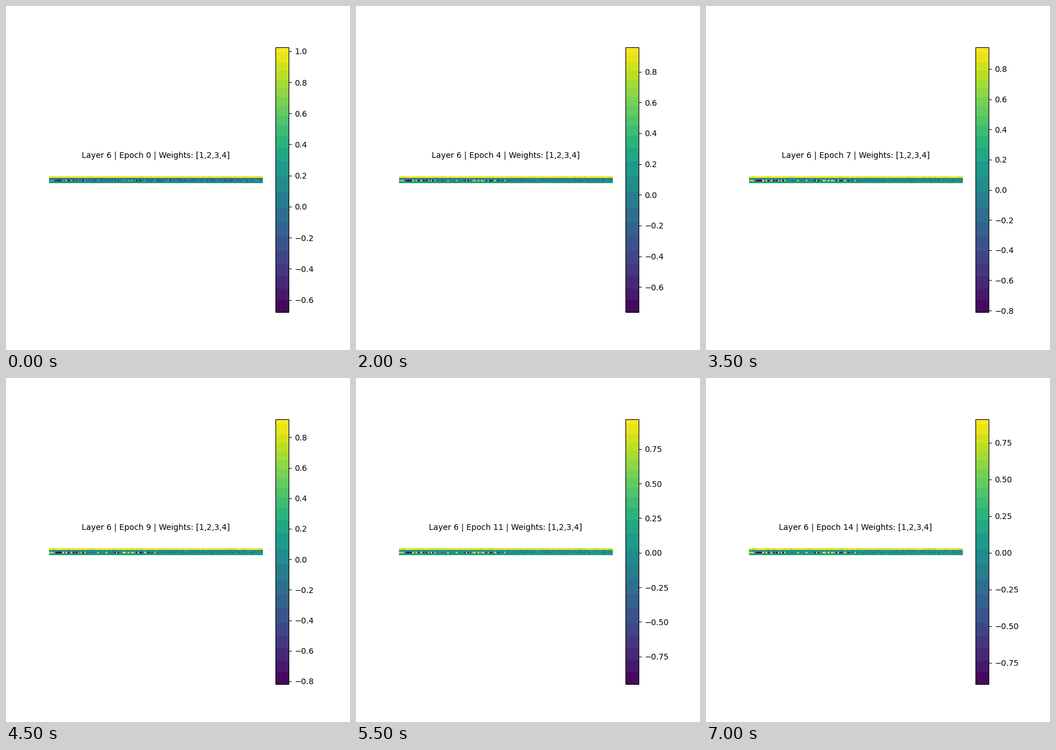
Recreate the animation shown at these times as a matplotlib script. Size 600 by 600 pixels, loop 7500 ms.

```python
import numpy as np
import matplotlib.pyplot as plt
from matplotlib.animation import FuncAnimation
from matplotlib.colors import ListedColormap

EPOCHS = 15
UNITS = 128
BANDS = 22.5

# Key points of the value range: epoch, lowest, highest
RANGE = np.array([
    (0, -.679, 1.025), (1, -.749, 1.001), (2, -.768, .981),
    (4, -.763, .959), (6, -.807, .957), (10, -.823, .905),
    (11, -.950, .965), (12.5, -1, .999), (14, -.896, .909),
])


def value_range(epoch):
    keys, low, high = RANGE.T
    return np.interp(epoch, keys, low), np.interp(epoch, keys, high)


def banded_viridis(size=462):
    """Viridis flattened into bands, narrower where its colour changes fast."""
    colors = plt.get_cmap("viridis")(np.linspace(1, 0, size))[:, :3]
    speed = np.linalg.norm(np.gradient(colors, axis=0), axis=1)
    speed = np.convolve(np.pad(speed, 10, mode="edge"), np.ones(21) / 21, "valid")
    path = np.cumsum(np.sqrt(speed))
    band = np.floor(path / path[-1] * BANDS + .5)
    flat = [colors[band == b].mean(axis=0) for b in band]
    return ListedColormap(flat[::-1])


rng = np.random.default_rng(6)
scale_noise, shift_noise, var_noise = rng.normal(0, 1, (3, UNITS))

# The first half of the units drifts to either extreme, the rest stays mild
unit = np.arange(UNITS)
pick = rng.random(UNITS)
bright = (unit < UNITS / 2) & (pick < .42)
dark = (unit < UNITS / 2) & (pick > .8)
end_mean = np.where(bright, .76, np.where(dark, -.75, -.03))
end_mean += rng.normal(0, .1, UNITS)
start_mean = .5 * end_mean + rng.normal(0, .17, UNITS)


def weights(epoch):
    """Rows: scale, shift, running mean, running variance."""
    grown = 1 - np.exp(-epoch / 3)
    drift = epoch / (EPOCHS - 1)
    scale = .95 - .14 * drift + (.02 + .03 * drift) * scale_noise
    shift = -.03 * (1 - drift) + (.03 + .04 * drift) * shift_noise
    mean = start_mean + (end_mean - start_mean) * grown
    var = .15 - .03 * drift + .02 * var_noise
    return np.vstack([scale, shift, mean, var])


fig, ax = plt.subplots(figsize=(6, 6), dpi=100)
fig.subplots_adjust(left=.125, right=.9, bottom=.11, top=.88)
image = ax.imshow(weights(0), cmap=banded_viridis(), interpolation="nearest")
image.set_clim(*value_range(0))
ax.axis("off")
fig.colorbar(image, ax=ax)
title = fig.text(261 / 600, 335 / 600, "", ha="center", va="baseline",
                 fontsize=10)


def update(epoch):
    image.set_data(weights(epoch))
    image.set_clim(*value_range(epoch))
    title.set_text(f"Layer 6 | Epoch {epoch} | Weights: [1,2,3,4]")
    return image, title


anim = FuncAnimation(fig, update, frames=EPOCHS, interval=500, repeat=True,
                     repeat_delay=0, blit=False)
plt.show()
```
